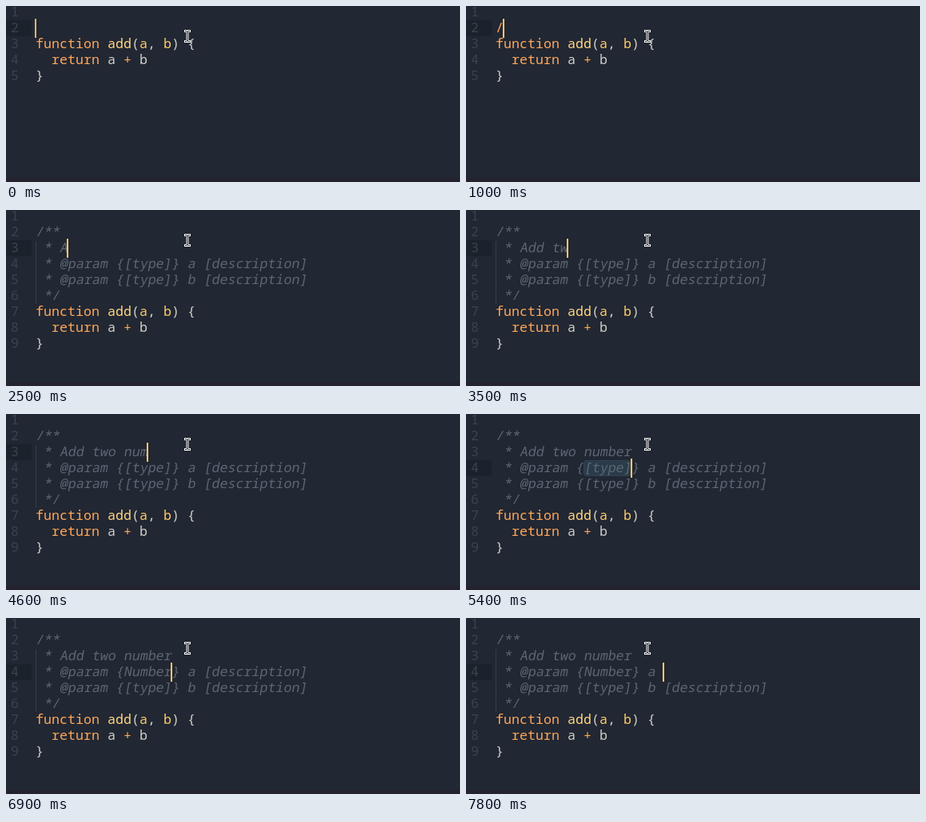
An HTML page for the animation above (8000 ms loop, 568 by 221 pixels).

```html
<!DOCTYPE html>
<html lang="en">
<head>
<meta charset="utf-8">
<title>Doc comment typing</title>
<style>
  html, body { margin: 0; width: 100%; height: 100%; overflow: hidden; background: #212733; }
  svg { display: block; width: 568px; height: 221px; }
  text { font: 16.667px "Noto Sans Mono", "DejaVu Sans Mono", monospace; white-space: pre; fill: #d0d0c8; }
  .num { fill: #3a434f; }
  .kw, .op { fill: #ffa759; }
  .fn { fill: #ffd57f; }
  .arg { fill: #ffcc66; }
  .com { fill: #5c6773; }
  #row { fill: #1c222c; }
  #sel { fill: #2a3b4a; stroke: #2f4454; }
  #dot { fill: #566575; }
  #guide { stroke: #4d5763; stroke-dasharray: 1 1; shape-rendering: crispEdges; }
  #caret { fill: #ffcc66; }
</style>
</head>
<body>
<svg viewBox="0 0 568 221">
  <defs>
    <path id="beam" d="M224.5 31.5h1.2l1.3 1l1.3-1h1.2M227 32.5v11M224.5 44.5h1.2l1.3-1l1.3 1h1.2"/>
  </defs>
  <rect width="568" height="221" fill="#212733"/>
  <rect y="216" width="568" height="5" fill="#24222e"/>
  <rect id="row" width="32" height="20"/>
  <rect id="sel" height="19" rx="3"/>
  <circle id="dot" r="1"/>
  <path id="guide" d="M37.5 40V117"/>
  <g id="lines"></g>
  <rect id="caret" width="2" height="24"/>
  <g fill="none" stroke-linecap="square">
    <use href="#beam" stroke="#fff" stroke-width="3"/>
    <use href="#beam" stroke="#14171d" stroke-width="1"/>
  </g>
</svg>
<script>
const LOOP = 8000, STEP = 100;
const COL = 10, ROW = 20, LEFT = 37, SLANT = -10;
const OPEN = [1000, 1400, 1600];
const EXPAND = 1900, TO_TYPE = 5400, TO_DESC = 7200, CLEAR = 7800;
const SUMMARY = [2500, 2800, 2900, 3100, 3200, 3500, 3900, 4100, 4200, 4400, 4600, 4800, 5000, 5100];
const TYPE = [6100, 6200, 6400, 6700, 6800, 6900];
const KEYS = [-100, ...OPEN, EXPAND, ...SUMMARY, TO_TYPE, ...TYPE, TO_DESC, CLEAR];

const CODE = [
  [['kw', 'function'], ['', ' '], ['fn', 'add'], ['', '('], ['arg', 'a'], ['', ', '], ['arg', 'b'], ['', ') {']],
  [['', '  '], ['kw', 'return'], ['', ' a '], ['op', '+'], ['', ' b']],
  [['', '}']]
];

const el = id => document.getElementById(id);
const set = (node, attrs) => { for (const k in attrs) node.setAttribute(k, attrs[k]); };
const comment = s => [['com', s]];
const flat = parts => comment(parts.map(p => p[1]).join(''));
const typed = (word, times, t) => word.slice(0, times.filter(k => k <= t).length);

function caretAlpha(t) {
  if (t < 100) return 0.87;
  const idle = t - Math.max(...KEYS.filter(k => k <= t));
  return idle < 400 ? 1 : Math.max(0, 0.7 - 0.35 * Math.floor((idle - 400) / STEP));
}

// Document, caret position and selection start at time t
function stateAt(t) {
  if (t < EXPAND) {
    const start = typed('/**', OPEN, t);
    const open = start.length > 1;
    return {
      lines: [[], open ? comment(start) : [['op', start]], ...(open ? CODE.map(flat) : CODE)],
      row: 2, col: start.length
    };
  }
  const summary = typed('Add two number', SUMMARY, t) || '[add description]';
  const type = typed('Number', TYPE, t) || '[type]';
  const desc = t < CLEAR ? '[description]' : '';
  const first = ' * ' + summary;
  const head = ' * @param {' + type;
  const second = head + '} a ' + desc;
  const lines = [
    [], comment('/**'), comment(first), comment(second),
    comment(' * @param {[type]} b [description]'), comment(' */'), ...CODE
  ];
  if (t < TO_TYPE) return { lines, row: 3, col: first.length, from: t < SUMMARY[0] ? 3 : null };
  if (t < TO_DESC) return { lines, row: 4, col: head.length, from: t < TYPE[0] ? 11 : null };
  return { lines, row: 4, col: second.length, from: t < CLEAR ? 21 : null };
}

// Comments lean gently; code stands upright
function lineMarkup(parts, i) {
  const y = 13 + i * ROW;
  const slant = parts.some(p => p[0] === 'com') ? SLANT : 0;
  const spans = parts.map(([cls, s]) => `<tspan class="${cls}">${s}</tspan>`).join('');
  return `<text class="num" x="6" y="${y}">${i + 1}</text>` +
    `<text transform="translate(${LEFT} ${y}) skewX(${slant})">${spans}</text>`;
}

function draw(t) {
  const { lines, row, col, from } = stateAt(t);
  const top = row * ROW - 22;
  const selected = from != null;
  el('lines').innerHTML = lines.map(lineMarkup).join('');
  set(el('row'), { y: top });
  set(el('caret'), { x: LEFT - 1 + col * COL, y: top - 2, opacity: caretAlpha(t) });
  set(el('sel'), {
    x: LEFT + (from || 0) * COL + 0.5, y: top + 0.5,
    width: selected ? (col - from) * COL - 1 : 0
  });
  set(el('dot'), { cx: LEFT + 7.5 * COL, cy: top + 10, opacity: selected && row === 3 ? 1 : 0 });
  set(el('guide'), { opacity: t >= EXPAND && !selected ? 1 : 0 });
}

let shown = -1;
function tick() {
  const t = Math.floor(performance.now() % LOOP / STEP) * STEP;
  if (t !== shown) draw(shown = t);
  requestAnimationFrame(tick);
}
tick();
</script>
</body>
</html>
```
